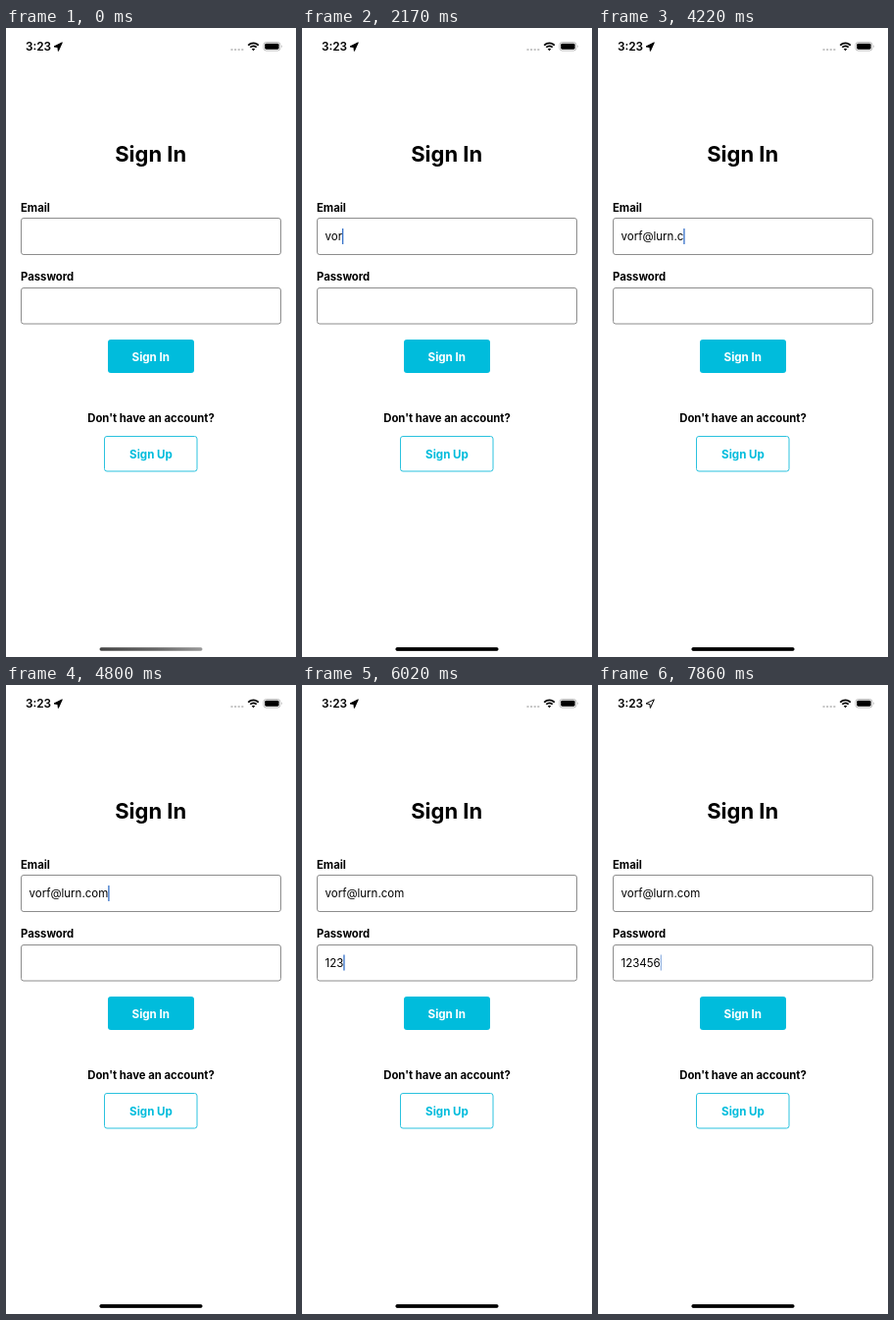
Write an HTML page that moves like this. It is 296 px wide and 640 px high and loops after 8 s.

```html
<!DOCTYPE html>
<html lang="en">
<head>
<meta charset="utf-8">
<title>Sign In</title>
<style>
  html, body { margin: 0; width: 100%; height: 100%; overflow: hidden; background: #fff; }
  svg { display: block; font: 700 11.3px Inter, sans-serif; }
  .mid { text-anchor: middle; }
  .field { fill: #fff; stroke: #808080; stroke-width: .9; }
  .input { font-weight: 400; font-size: 11.5px; }
</style>
</head>
<body>
<svg width="296" height="640" viewBox="0 0 296 640">
  <defs>
    <linearGradient id="fade">
      <stop stop-color="#444"/><stop offset=".55" stop-color="#666"/><stop offset="1" stop-color="#999"/>
    </linearGradient>
  </defs>

  <!-- status bar -->
  <text x="20" y="23" font-size="11.8" font-weight="600">3:23</text>
  <path id="arrow" d="M57.3 14.8 49 18.9 52.9 19.5 53.4 23.4Z" stroke="#000" stroke-linejoin="round"/>
  <path d="M229.500 22h2m1.600 0h2m1.600 0h2m1.600 0h2" stroke="#c4c4c4" stroke-width="1.8"/>
  <path d="M247.200 17.600a7.500 7.500 0 0 1 10.600 0M249.300 19.700a4.500 4.500 0 0 1 6.400 0" fill="none" stroke="#000" stroke-width="1.8"/>
  <path d="M252.500 23.300l-1.700-1.800a2.400 2.400 0 0 1 3.400 0z"/>
  <rect x="262.900" y="14.500" width="17" height="8.500" rx="2.600" fill="none" stroke="#aaa" stroke-width=".8"/>
  <rect x="264.200" y="15.800" width="14.400" height="5.900" rx="1.400"/>
  <path d="M281 17.300q1.500 1.400 0 2.900z" fill="#aaa"/>

  <!-- form -->
  <text class="mid" x="147.700" y="136" font-size="22">Sign In</text>
  <text x="15" y="186.500">Email</text>
  <rect class="field" x="15.500" y="193.500" width="265" height="37" rx="2.500"/>
  <text x="15" y="257">Password</text>
  <rect class="field" x="15.500" y="264.500" width="265" height="36.500" rx="2.500"/>
  <text id="email" class="input" x="23.500" y="216.300"></text>
  <text id="password" class="input" x="23.500" y="286.800"></text>
  <rect id="caret" width="1.300" height="16" fill="#3470c8"/>

  <rect x="104" y="317" width="88" height="34" rx="3" fill="#00bcdc"/>
  <text class="mid" x="147.800" y="338.500" font-size="11.6" fill="#fff">Sign In</text>
  <text class="mid" x="148" y="401">Don't have an account?</text>
  <rect x="100.500" y="415.500" width="94.500" height="35.500" rx="2.500" fill="#fff" stroke="#2bc2de"/>
  <text class="mid" x="148" y="438" font-size="11.6" fill="#00bcdc">Sign Up</text>

  <!-- home indicator -->
  <rect x="95.500" y="630.200" width="105" height="3.500" rx="1.750" fill="url(#fade)"/>
  <rect id="home" x="95.500" y="630.200" width="105" height="3.500" rx="1.750"/>
</svg>
<script>
const LOOP = 8000;
const $ = id => document.getElementById(id);
const email = $('email'), password = $('password'), caret = $('caret');

// [time, value] pairs; each value holds until the next time.
const emailKeys = [[0, 0], [1790, 1], [2170, 3], [2330, 4], [3240, 6], [3420, 7], [3600, 8],
  [3750, 9], [3930, 10], [4220, 11], [4350, 12], [4560, 13]];
const passwordKeys = [[0, 0], [5790, 1], [5900, 2], [6010, 3], [6130, 4], [6320, 5], [6870, 6]];
const caretAlpha = [[0, 0], [1310, 1], [7400, .45], [7520, 0], [7740, .2], [7860, .5]];
const homeAlpha = [[0, 0], [1310, .6], [1490, 1]];

const at = (keys, t) => keys.findLast(([time]) => time <= t)[1];

function draw(t) {
  email.textContent = 'vorf@lurn.com'.slice(0, at(emailKeys, t));
  password.textContent = '123456'.slice(0, at(passwordKeys, t));

  const onPassword = t >= 5550;
  const active = onPassword ? password : email;
  const typed = active.textContent ? active.getComputedTextLength() : 0;
  caret.setAttribute('x', 23.5 + typed);
  caret.setAttribute('y', onPassword ? 274.5 : 204);
  caret.setAttribute('opacity', at(caretAlpha, t));

  $('arrow').setAttribute('fill', t < 6320 ? '#000' : '#fff');
  $('home').setAttribute('opacity', at(homeAlpha, t));
}

const start = performance.now();
function tick() {
  draw((performance.now() - start) % LOOP);
  requestAnimationFrame(tick);
}
tick();
</script>
</body>
</html>
```
